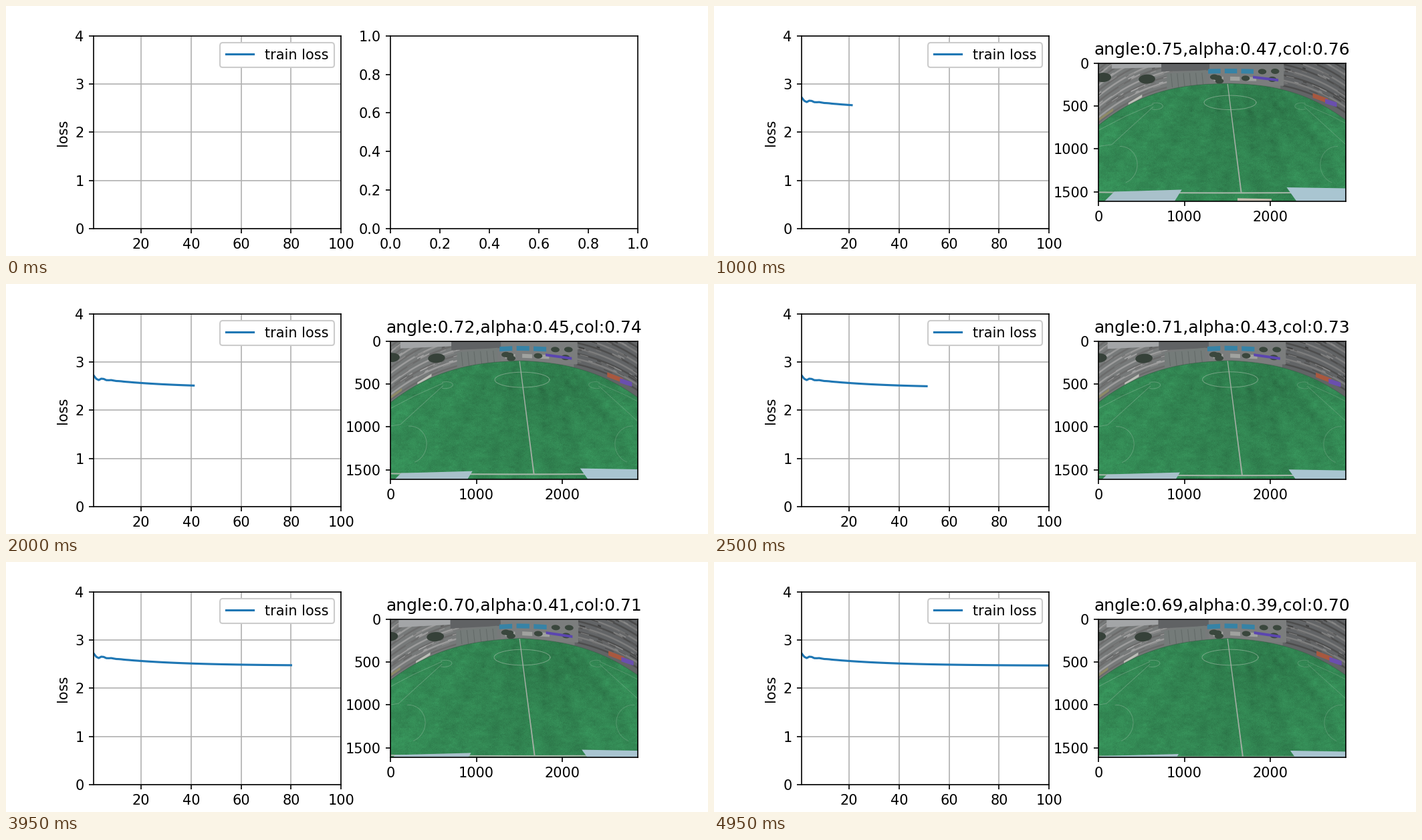
Write a matplotlib script that moves like this. It is 1050 px wide and 375 px high and loops after 5000 ms.

```python
import numpy as np
import matplotlib.pyplot as plt
from matplotlib.animation import FuncAnimation
from matplotlib.collections import PolyCollection
from matplotlib.lines import Line2D
from matplotlib.patches import Polygon
from matplotlib.transforms import Affine2D

W, H, DPI = 1050, 375, 150
FRAMES, INTERVAL = 100, 50
PHOTO_W, PHOTO_H = 2880, 1610
CX = 770  # horizontal centre of the lens distortion, in stage pixels

plt.rcParams["font.family"] = "DejaVu Sans"
fig, (ax_loss, ax_photo) = plt.subplots(1, 2, figsize=(W / DPI, H / DPI), dpi=DPI)
stage = Affine2D().scale(1 / W, -1 / H).translate(0, 1) + fig.transFigure

epochs = np.arange(1, FRAMES + 1)
wobble = .053 * np.exp((1 - epochs) / 3) * np.cos(2 * np.pi * (epochs - 1) / 3.6)
loss = 2.468 + .185 * np.exp((3 - epochs) / 27) + wobble

# fitted camera parameters at a few key frames
KEYS = [0, 30, 50, 66, 99]
PARAMS = {
    "angle": [.778, .737, .712, .707, .690],
    "alpha": [.495, .457, .434, .423, .392],
    "col": [.785, .750, .732, .722, .698],
}


def progress(i):
    """Eased camera motion: 0 at frame 10, 1 at the last frame."""
    return (1 - np.exp((10 - i) / 50)) / (1 - np.exp(-89 / 50))


def edge_y(x):
    """Far edge of the pitch."""
    return 117.5 + 63 * (np.abs(x - 765) / 190) ** 2.6


def warp(points, bend):
    """Spread points away from the centre as the lens bends."""
    points = np.asarray(points, float)
    dx = points[..., 0] - CX
    x = CX + dx * (1 + .075 * bend)
    y = points[..., 1] + bend * (.06 * np.abs(dx) - 3)
    return np.stack([x, y], axis=-1)


def mirror(points):
    return np.asarray(points, float) * [-1, 1] + [2 * CX, 0]


def ellipse(x, y, rx, ry, start=0, stop=360):
    a = np.radians(np.linspace(start, stop, 50))
    return np.column_stack([x + rx * np.cos(a), y + ry * np.sin(a)])


def slab(x, y, width, height, slope=0):
    """A sheared rectangle; slope is the drop per pixel to the right."""
    drop = slope * width
    return [(x, y), (x + width, y + drop),
            (x + width, y + drop + height), (x, y + height)]


def soft_noise(rng, shape, cell_h, cell_w):
    rows, cols = shape
    coarse = rng.normal(size=(rows // cell_h + 1, cols // cell_w + 1))
    noise = np.kron(coarse, np.ones((cell_h, cell_w)))[:rows, :cols]
    for axis, cell in ((0, cell_h), (1, cell_w)):
        noise = sum(np.roll(noise, k, axis) for k in range(cell)) / cell
    return noise


def make_grass(rng, shape=(207, 370)):
    y, x = np.mgrid[:shape[0], :shape[1]]
    fan = (x - 193) / (y + 60)
    shade = .02 * np.sin(fan * 16 + .5 * np.sin(y / 31)) + .015 * np.sin(fan * 37 + y / 40)
    shade += .03 * soft_noise(rng, shape, 9, 12) + .025 * soft_noise(rng, shape, 3, 5)
    shade += .025 * rng.normal(size=shape)
    shade -= .08 * np.exp(-((x - 235) / 80) ** 2 - ((y - 75) / 45) ** 2)
    shade += .06 * (np.abs(x - 195) / 185) ** 2
    return np.clip(np.array([50, 133, 82]) / 255 * (1 + shade[..., None]), 0, 1)


def make_tiles(rng, count=110):
    """Small facade pieces that lean along the pitch edge, for the left side."""
    x, lift = rng.uniform(535, 685, count), rng.uniform(9, 80, count)
    width, height = rng.uniform(4, 13, count), rng.uniform(1, 2.5, count)
    top = edge_y(x) - lift
    slope = (edge_y(x + width) - edge_y(x)) / width
    quads = [slab(*tile) for tile in zip(x, top, width, height, slope)]
    return np.array(quads), np.repeat(rng.uniform(-.17, .17, (count, 1)), 3, axis=1)


rng = np.random.default_rng(7)
GRASS = make_grass(rng)
TILES, TILE_TONES = make_tiles(rng)
BUSHES = np.column_stack([rng.uniform(742, 848, 7), rng.uniform(95, 114, 7)])


def fill(points, color):
    return ax_photo.add_artist(Polygon(points, closed=True, fc=color, lw=0,
                                       zorder=1, transform=stage))


def stroke(points, color, width=1, alpha=1):
    ax_photo.add_artist(Line2D(*np.transpose(points), color=color,
                               lw=width * 72 / DPI, alpha=alpha,
                               zorder=1, transform=stage))


def draw_stand(bend, tone, flip):
    """Terraced rows that follow the pitch edge."""
    place = mirror if flip else np.asarray
    x = np.linspace(535, 690, 30)
    for row in range(11):
        points = np.column_stack([x, edge_y(x) - 4 - 8 * row])
        gray = tone + (.09 if row % 2 else -.10)
        stroke(warp(place(points), bend), str(gray), 2.5)
    ax_photo.add_collection(
        PolyCollection(warp(place(TILES), bend), facecolors=tone + TILE_TONES,
                       linewidths=0, zorder=1, transform=stage), autolim=False)


def draw_surroundings(bend):
    def block(color, *shape):
        fill(warp(slab(*shape), bend), color)

    fill(slab(570, 80, 380, 220), "#777a7a")
    block("#626466", 845, 60, 150, 170)
    draw_stand(bend, .52, flip=False)
    draw_stand(bend, .40, flip=True)

    # buildings and boards behind the far side
    block("#a3a5a7", 600, 80, 72, 11)
    block("#606264", 672, 80, 70, 17)
    block("#7b7d7d", 742, 80, 108, 39)
    block("#747b79", 680, 101, 57, 24, -.08)
    for x in range(686, 737, 9):
        stroke(warp([(x, 101), (x + 2, 121)], bend), "#626967")
    for x in range(740, 800, 24):
        block("#3683a6", x, 95, 18, 7)
        block("#a0a29f", x + 8, 107, 14, 6)
    for x, y in BUSHES:
        fill(warp(ellipse(x, y, 6, 4), bend), "#3a473d")
    for x, y in ((587, 104), (651, 108)):
        fill(warp(ellipse(x, y, 12, 7), bend), "#364139")

    block("#5b46b0", 805, 105, 37, 4, .1)
    block("#a8583f", 892, 129, 22, 7, .35)
    block("#6a4fae", 910, 137, 17, 7, .3)
    block("#bdbfb8", 624, 143, 20, 4, -.6)
    block("#8d8a66", 580, 166, 22, 4, -.7)


def draw_pitch(bend, slide):
    x = np.linspace(530, 1010, 80)
    edge = warp(np.column_stack([x, edge_y(x)]), bend)
    field = fill(np.vstack([edge, [(1020, 320), (520, 320)]]), "#328552")
    ax_photo.imshow(GRASS, zorder=1, extent=(-.5, PHOTO_W - .5, PHOTO_H - .5, -.5)
                    ).set_clip_path(field)
    stroke(edge, "#3d5a48", 1.2, .5)

    touchline = [(540, 203), (575, 186), (620, 163), (660, 146)]
    box = [(540, 212), (600, 205), (625, 182), (660, 150)]
    for line in (touchline, box, ellipse(664, 149, 10, 5, -120, 120),
                 ellipse(612, 236, 25, 28, -90, 70)):
        stroke(warp(line, bend), "#9fc0a8", alpha=.4)
        stroke(warp(mirror(line), bend), "#9fc0a8", alpha=.3)
    stroke(ellipse(772, 146 - 3 * bend, 37 + 5 * bend, 10 + 1.8 * bend),
           "#a3bda8", alpha=.6)

    base, top, foot = 277 + 15.5 * slide, 118 - 3 * bend, 788 + 3 * slide
    x = np.linspace(570, 950, 40)
    stroke(np.column_stack([x, base - ((x - CX) / 195) ** 2]), "#a9b8ab", 2)
    fill([(767.6, top), (768.8, top), (foot + 1, base), (foot - 1, base)], "#a3afa4")


def draw_foreground(slide):
    left, right, y = 604 - 24 * slide, 701 - 6 * slide, 272 + 16 * slide
    fill([(left, y + 3), (right, y), (right - 26, y + 42), (left - 40, y + 42)], "#a9c1cb")
    left, y = 855 + 7 * slide, 269 + 14 * slide
    fill([(left, y), (950, y + 1.5), (950, y + 45), (left + 32, y + 45)], "#a9c5d1")
    fill(slab(783, 285 + 15 * slide, 51, 20, .02), "#c3bcae")


curve, = ax_loss.plot([], [], label="train loss")
ax_loss.set(xlim=(1, 100), ylim=(0, 4), yticks=range(5), ylabel="loss")
ax_loss.grid()
ax_loss.legend(loc="upper right", framealpha=1)


def update(i):
    curve.set_data(epochs[:i + 1], loss[:i + 1])
    ax_photo.clear()
    if i == 0:
        ax_photo.set_aspect("auto")
        return
    slide = progress(i)
    bend = 1 - (1 - slide) ** 2
    draw_surroundings(bend)
    draw_pitch(bend, slide)
    draw_foreground(slide)
    ax_photo.set_title(",".join(f"{name}:{np.interp(i, KEYS, values):.2f}"
                                for name, values in PARAMS.items()))


anim = FuncAnimation(fig, update, frames=FRAMES, interval=INTERVAL,
                     init_func=lambda: None, repeat=True, repeat_delay=0)
plt.show()
```
